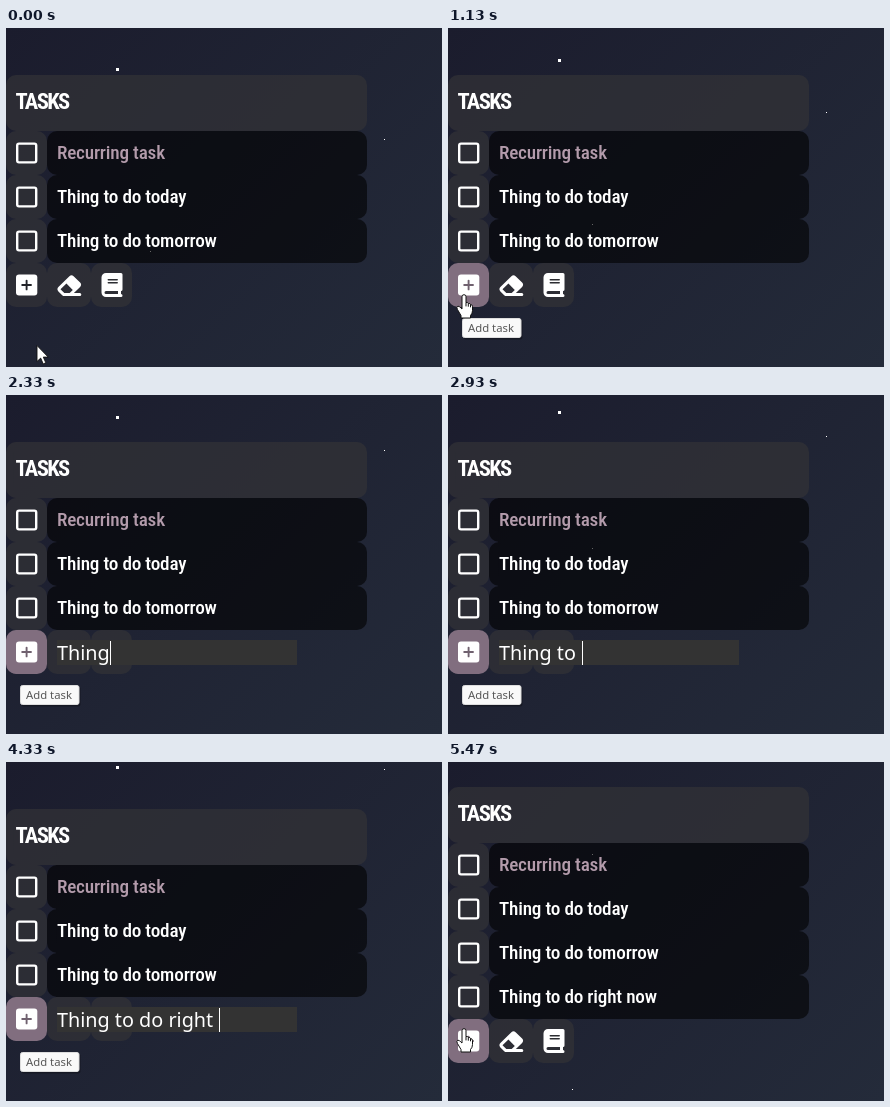
These frames come from a looping animation (436x339 px, 5.54 s). An HTML page:

```html
<!DOCTYPE html>
<html lang="en">
<head>
<meta charset="utf-8">
<title>Task list</title>
<style>
  html, body { margin: 0; width: 100%; height: 100%; overflow: hidden; background: #1f2231; }
  svg { display: block; width: 100vw; height: 100vh; }
  text { white-space: pre; fill: #fff; }
  .title, .task { font-family: "Roboto Condensed", Roboto, sans-serif; font-stretch: 75%; }
  .title { font-size: 22.5px; font-weight: 700; letter-spacing: -1.6px; }
  .task { font-size: 19.2px; font-weight: 450; letter-spacing: -.2px; }
  .typed { font: 400 19.8px "Noto Sans", sans-serif; }
  .tip { font: 400 11.3px "Noto Sans", sans-serif; fill: #575757; }
  .cell { fill: #323236; fill-opacity: .72; }
  .row { fill: #000; fill-opacity: .6; }
</style>
</head>
<body>
<svg id="stage" viewBox="0 0 436 339" xmlns="http://www.w3.org/2000/svg">
  <defs>
    <linearGradient id="sky" gradientUnits="userSpaceOnUse" x1="24" y1="-24" x2="412" y2="363">
      <stop offset="0" stop-color="#1b1c2d"/>
      <stop offset="1" stop-color="#242b3a"/>
    </linearGradient>
  </defs>
  <rect width="436" height="339" fill="url(#sky)"/>
  <g id="stars" fill="#fff" shape-rendering="crispEdges"></g>

  <g id="list">
    <rect class="cell" y="47" width="361" height="56" rx="10"/>
    <text class="title" x="9.5" y="81.4">TASKS</text>
    <g id="rows"></g>
  </g>

  <g id="bar">
    <rect id="addCell" y="235" width="41" height="44" rx="10"/>
    <rect class="cell" x="41" y="235" width="44" height="44" rx="10"/>
    <rect class="cell" x="85" y="235" width="41" height="44" rx="10"/>
    <rect x="10" y="246.5" width="21.3" height="21" rx="3" fill="#fff"/>
    <path id="plus" d="M16.2 257H25M20.6 252.6V261.4" stroke-width="1.9" stroke-linecap="round"/>
    <g id="tools" fill="#fff" fill-rule="evenodd">
      <path d="M63.4 248.2L52.4 259.1q-2 2.1 0 4.3L56.2 267.2q.9.9 2.1.9H73.8a1.5 1.5 0 0 0 0-3H67.9L74.1 258.9q2-2.1 0-4.3L67.6 248.2q-2.1-2-4.2 0Z
               M54.5 261.3L60.4 255.4L66.8 261.9L63.7 265H58.3Z"/>
      <path d="M100 245H115a1.5 1.5 0 0 1 1.5 1.5V261.5a1.5 1.5 0 0 1-1.5 1.5V266a1.5 1.5 0 0 1 0 3H100a4.5 4.5 0 0 1-4.5-4.5V249.5a4.5 4.5 0 0 1 4.5-4.5Z
               M100 263H112V266H100a1.5 1.5 0 0 1 0-3Z"/>
      <path stroke="#2b2c31" stroke-width="1.5" stroke-linecap="round" d="M102.3 251.75H111.2M102.3 254.75H111.2"/>
    </g>
  </g>

  <g id="input">
    <rect x="51" y="245" width="240" height="25" fill="#333"/>
    <text class="typed" id="typed" x="51" y="265"></text>
    <rect id="caret" y="246" width="1" height="24" fill="#fff" shape-rendering="crispEdges"/>
  </g>

  <g id="tip">
    <rect x="15.5" y="291.5" width="59" height="20" rx="2" fill="#000" opacity=".3"/>
    <rect x="14.5" y="290.5" width="58.5" height="19" rx="2" fill="#f9f9f9" stroke="#ddd"/>
    <text class="tip" x="20" y="304">Add task</text>
  </g>

  <path id="arrow" fill="#fff" stroke="#111" stroke-width=".9" d="M0 0V16L3.7 12.6L6.2 18.4L8.8 17.3L6.3 11.6H11.2Z"/>
  <g id="hand" stroke="#111" stroke-width="1" stroke-linejoin="round">
    <path fill="#fff" d="M-2 1.7a2 2 0 0 1 4 0V7.6q1.8-.8 2.3 1q1.8-.7 2.2 1q1.7-.3 2 1.7V15.5q0 3-2 5V23H-3V20.5L-6.6 14.4q-1.4-2.8.5-3.2q1.6-.1 2.9 1.8L-2 14Z"/>
    <path fill="none" d="M2 7.6V11.4M4.3 8.6V11.7M6.5 9.6V12.3"/>
  </g>
</svg>
<script>
const LOOP = 5540, STEP = 200 / 3;
const HOVER = 400, ARRIVE = 560, TIP = 1060, OPEN = 1330, TYPE = 1730, KEY = 150,
      CLOSE = 4930, ADDED = 5200;
const PHRASE = "Thing to do right now";
const TASKS = ["Recurring task", "Thing to do today", "Thing to do tomorrow", PHRASE];
// x, top at t = 0, size, upward speed in px/s
const STARS = [[110, 40.9, 3, 8.3], [378, 111.9, 1, 24], [144, 223.9, 1, 24], [124, 459, 1, 24]];

const $ = id => document.getElementById(id);
const clamp = v => Math.max(0, Math.min(1, v));
const mix = (a, b, k) => a + (b - a) * k;
const set = (el, attrs) => { for (const k in attrs) el.setAttribute(k, attrs[k]); };
const show = (id, on) => set($(id), { visibility: on ? "visible" : "hidden" });
const move = (id, x, y) => set($(id), { transform: `translate(${x} ${y})` });
const rgba = (a, b, k) => `rgba(${a.map((v, i) => mix(v, b[i], k).toFixed(2)).join()})`;

$("rows").innerHTML = TASKS.map((name, i) => `
  <g transform="translate(0 ${103 + 44 * i})"${i === 3 ? ' id="newRow"' : ""}>
    <rect class="cell" width="41" height="44" rx="10"/>
    <rect class="row" x="41" width="320" height="44" rx="10"/>
    <rect x="11.2" y="12.6" width="19" height="18.8" rx="1.8" fill="none" stroke="#fff" stroke-width="2.4"/>
    <text class="task" x="51" y="28"${i ? "" : ' style="fill:#b39bab"'}>${name}</text>
  </g>`).join("");
$("stars").innerHTML = STARS.map(([x, , s]) => `<rect x="${x}" width="${s}" height="${s}"/>`).join("");
const stars = [...$("stars").children];

function render(t) {
  stars.forEach((el, i) => {
    const [, top, , speed] = STARS[i];
    set(el, { y: Math.floor(top - t / 1000 * speed) });
  });

  const added = t >= ADDED, open = t >= OPEN && t < CLOSE;
  move("list", 0, added ? -22 : 0);
  move("bar", 0, added ? 22 : 0);
  show("newRow", added);

  const hover = clamp((t - HOVER) / 160);
  set($("addCell"), { fill: rgba([50, 50, 54, .72], [129, 110, 127, 1], hover) });
  set($("plus"), { stroke: rgba([34, 35, 40, 1], [112, 97, 111, 1], hover) });
  show("tools", !open);

  show("input", open);
  const count = open ? Math.max(0, Math.min(PHRASE.length, Math.floor((t - TYPE) / KEY + 1.05))) : 0;
  $("typed").textContent = PHRASE.slice(0, count);
  const width = count ? $("typed").getComputedTextLength() : 0;
  set($("caret"), { x: Math.round(51.5 + width) });
  show("tip", t >= TIP && t < CLOSE);

  const k = clamp(t / ARRIVE), ease = k * k * (3 - 2 * k);
  const x = mix(31, 16, ease), y = mix(317.5, 267, ease);
  const typing = t >= TYPE && t < CLOSE;
  show("arrow", t < HOVER);
  show("hand", t >= HOVER && !typing);
  move("arrow", x, y);
  move("hand", x, y);
}

function tick() {
  const t = performance.now() % LOOP;
  render(Math.floor((t + 4) / STEP) * STEP);
  requestAnimationFrame(tick);
}
render(0);
requestAnimationFrame(tick);
</script>
</body>
</html>
```
